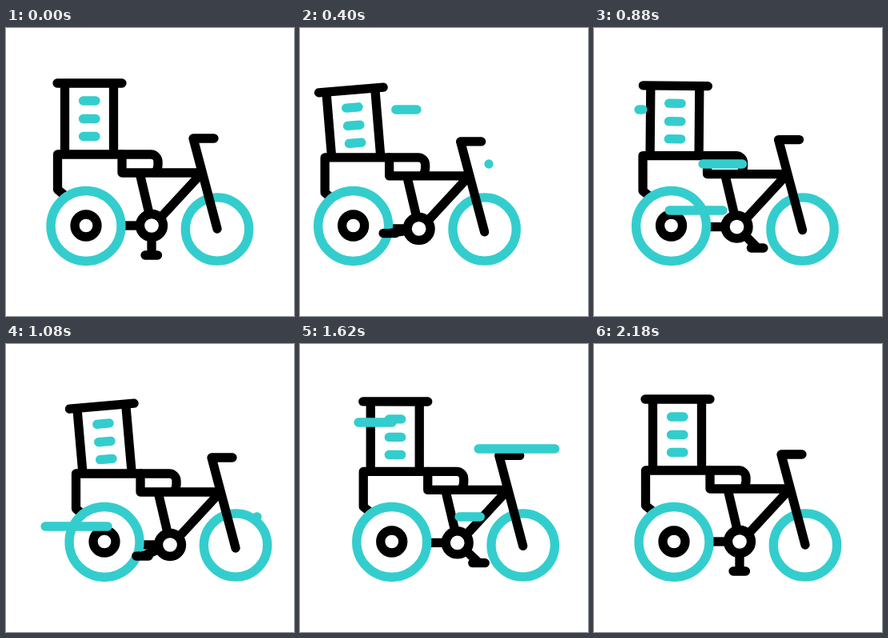
An HTML page that plays this animation: 360x360 px, repeating every 2420 ms.

```html
<!DOCTYPE html>
<html lang="en">
<head>
<meta charset="utf-8">
<title>Cargo bike</title>
<style>
  html, body { margin: 0; width: 100%; height: 100%; overflow: hidden; background: #fff; }
  svg { display: block; width: 100%; height: 100%; fill: none; stroke: #000; stroke-width: 11.3; stroke-linecap: round; stroke-linejoin: round; }
  .teal { stroke: #34cdcd; }
  .butt { stroke-linecap: butt; }
</style>
</head>
<body>
<svg viewBox="0 0 360 360">
  <g id="bike">
    <g id="stack">
      <path class="butt" d="M73.5 69V155M134.5 69V155"/>
      <path d="M64 69H145"/>
      <path class="teal" d="M96.5 91H112M96.5 113.5H112M96.5 135.5H112"/>
    </g>
    <g class="sprung">
      <path d="M72 208L64.5 202V158H181a9 9 0 0 1 9 9V171q0 5-3 9"/>
      <path class="butt" d="M146 247H166"/>
    </g>
    <g class="teal">
      <circle cx="100" cy="247.5" r="44"/>
      <circle cx="264" cy="251.5" r="39.7"/>
    </g>
    <circle cx="100" cy="247" r="14"/>
    <g class="sprung">
      <path d="M145 158V181H245L196 234M167 181L179 232M260 138H234L264 251"/>
      <circle cx="182" cy="247" r="14.5"/>
      <path id="pedal"/>
    </g>
  </g>
  <g id="wind" class="teal"></g>
</svg>
<script>
const LOOP = 2420, BEAT = 2180 / 6;
const $ = id => document.getElementById(id);
const sprung = document.querySelectorAll('.sprung');

const clamp = u => Math.min(1, Math.max(0, u));
const ease = u => clamp(u) ** 2 * (3 - 2 * clamp(u));

// Eased value through [time, value] keys.
function track(t, keys) {
  let v = keys[0][1];
  for (let i = 1; i < keys.length; i++) {
    const [t0, v0] = keys[i - 1], [t1, v1] = keys[i];
    v += (v1 - v0) * ease((t - t0) / (t1 - t0));
  }
  return v;
}
const beats = values => values.map((v, i) => [i * BEAT, v]);

const drift = [[0, 0], [520, -38.5], [1248, 32.5], [1950, 0]];
const bounce = beats([0, 4, 0, 4, 0, 3.2, 0]);
const tilt = beats([0, -5, 4, -5, 4, -5, 0]);

// Wind streaks: start time, right end, y, travel.
const GROW = 400, LAG = 280;
const streaks = [
  [258, 146, 102, 90],
  [400, 236, 170, 100],
  [655, 161, 228, 112],
  [1065, 314, 216, 115],
  [1120, 173, 98, 100],
  [1316, 320, 131, 113]
].map(([start, x, y, travel]) => {
  const el = document.createElementNS('http://www.w3.org/2000/svg', 'path');
  $('wind').append(el);
  return { el, start, x, y, travel };
});

function draw(t) {
  const dy = track(t, bounce);
  $('bike').setAttribute('transform', `translate(${track(t, drift)} 0)`);
  sprung.forEach(g => g.setAttribute('transform', `translate(0 ${dy})`));
  $('stack').setAttribute('transform',
    `translate(0 ${dy * 2.1}) rotate(${track(t, tilt)} 104.5 158)`);

  const a = ease(t / 1920) * 4 * Math.PI;
  const sx = -Math.sin(a), sy = Math.cos(a);
  const px = 182 + 37 * sx, py = 247 + 37 * sy;
  $('pedal').setAttribute('d',
    `M${182 + 18 * sx} ${247 + 18 * sy}L${px} ${py}M${px - 8} ${py}h15.5`);

  for (const { el, start, x, y, travel } of streaks) {
    const age = t - start;
    const head = x - travel * ease(age / GROW);
    const tail = x - travel * ease((age - LAG) / GROW);
    const on = age > 0 && age < GROW + LAG;
    el.setAttribute('d', on ? `M${head} ${y}H${tail + 0.01}` : '');
  }
}

const begin = performance.now();
function tick() {
  draw((performance.now() - begin) % LOOP);
  requestAnimationFrame(tick);
}
tick();
</script>
</body>
</html>
```
